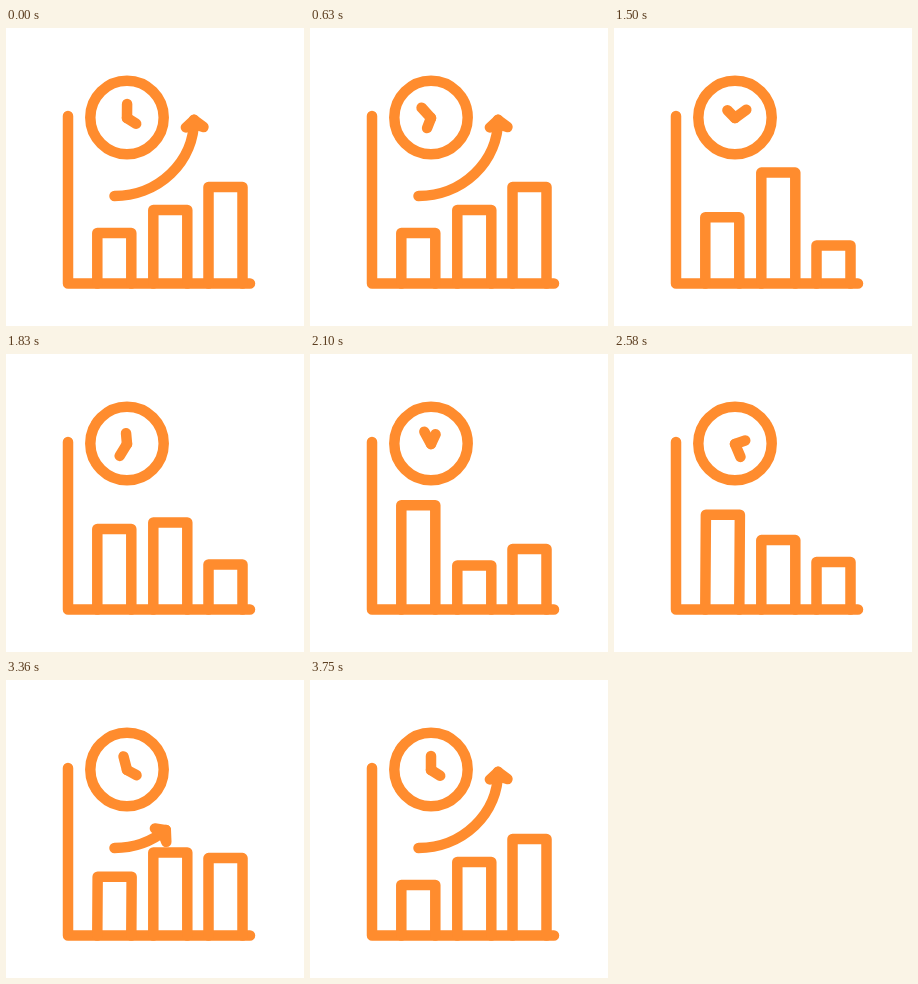
Write an HTML page that moves like this. It is 298 px wide and 298 px high and loops after 3.93 s.

```html
<!DOCTYPE html>
<html lang="en">
<head>
<meta charset="utf-8">
<title>Growth over time</title>
<style>
  html, body { margin: 0; height: 100%; overflow: hidden; background: #fff; }
  svg { display: block; width: 100vw; height: 100vh; }
  svg * { fill: none; stroke: #ff8c2e; stroke-width: 10.5; stroke-linecap: round; stroke-linejoin: round; }
</style>
</head>
<body>
<svg viewBox="0 0 298 298">
  <path d="M62 88V255.5H244"/>
  <path class="bar"/><path class="bar"/><path class="bar"/>
  <circle cx="121" cy="89.5" r="36.7"/>
  <path id="minute" d="M121 90V76"/>
  <path id="hour" d="M121 90V79.2"/>
  <g id="arrow">
    <path id="shaft" d="M108.5 168A79.5 76 0 0 0 188 92V-300"/>
    <path id="head" d="M-8 7.5L0 0L9.5 7L0 4Z"/>
  </g>
</svg>
<script>
const LOOP = 3930, START = 900, STEP = 675, END = 3600;
const $ = id => document.getElementById(id);
const minute = $('minute'), hour = $('hour'), arrow = $('arrow'), shaft = $('shaft'), head = $('head');
const barPaths = document.querySelectorAll('.bar');

// Top edge of each bar at START, START + STEP, ...; lean shifts the top sideways
const bars = [
  { x: 91.3, tops: [205, 188.7, 146, 176.5, 205], lean: [0, 0, 0, 1.2, 0] },
  { x: 147.3, tops: [182, 143.3, 221.3, 148.8, 182], lean: [0, 0, 0, 0, 0] },
  { x: 202.5, tops: [159, 219.5, 191.5, 225.5, 159], lean: [0, 0, 0, 0, 0] }
];

const clamp = v => Math.min(1, Math.max(0, v));
const smooth = u => u * u * (3 - 2 * u);

// Cubic curve (1/6, 1/6, 2/3, 1): steady start, soft stop
function slowDown(x) {
  let lo = 0, hi = 1;
  const curve = (s, a, b) => 3 * s * (1 - s) ** 2 * a + 3 * s * s * (1 - s) * b + s ** 3;
  for (let i = 0; i < 24; i++) {
    const mid = (lo + hi) / 2;
    if (curve(mid, 1 / 6, 2 / 3) < x) lo = mid; else hi = mid;
  }
  return curve(lo, 1 / 6, 1);
}

function keyed(values, t) {
  const k = Math.min(4, Math.max(0, (t - START) / STEP));
  const i = Math.min(3, Math.floor(k));
  return values[i] + (values[i + 1] - values[i]) * smooth(k - i);
}

const restLength = shaft.getTotalLength() - 392;

function drawArrow(t) {
  let from = 0, to = restLength;
  if (t < 2250) {
    const e = smooth(clamp((t - START) / STEP));
    to += 315 * e;
    from = 680 * e;
  } else {
    to *= smooth(clamp((t - 3150) / (END - 3150)));
  }
  const visible = to - from > 0.5;
  arrow.style.display = visible ? '' : 'none';
  if (!visible) return;
  shaft.style.strokeDasharray = `${to - from} 9999`;
  shaft.style.strokeDashoffset = -from;
  const tip = shaft.getPointAtLength(to), behind = shaft.getPointAtLength(Math.max(0, to - 0.5));
  const angle = Math.atan2(tip.y - behind.y, tip.x - behind.x) * 180 / Math.PI + 90;
  head.setAttribute('transform', `translate(${tip.x} ${tip.y}) rotate(${angle})`);
}

function draw() {
  const t = performance.now() % LOOP;
  const turn = slowDown(clamp(t / END));
  minute.setAttribute('transform', `rotate(${1440 * turn} 121 90)`);
  hour.setAttribute('transform', `rotate(${122 + 360 * turn} 121 90)`);
  bars.forEach(({ x, tops, lean }, i) => {
    const y = keyed(tops, t), dx = keyed(lean, t);
    barPaths[i].setAttribute('d', `M${x} 255.5L${x + dx} ${y}h34L${x + 34} 255.5`);
  });
  drawArrow(t);
  requestAnimationFrame(draw);
}
draw();
</script>
</body>
</html>
```
